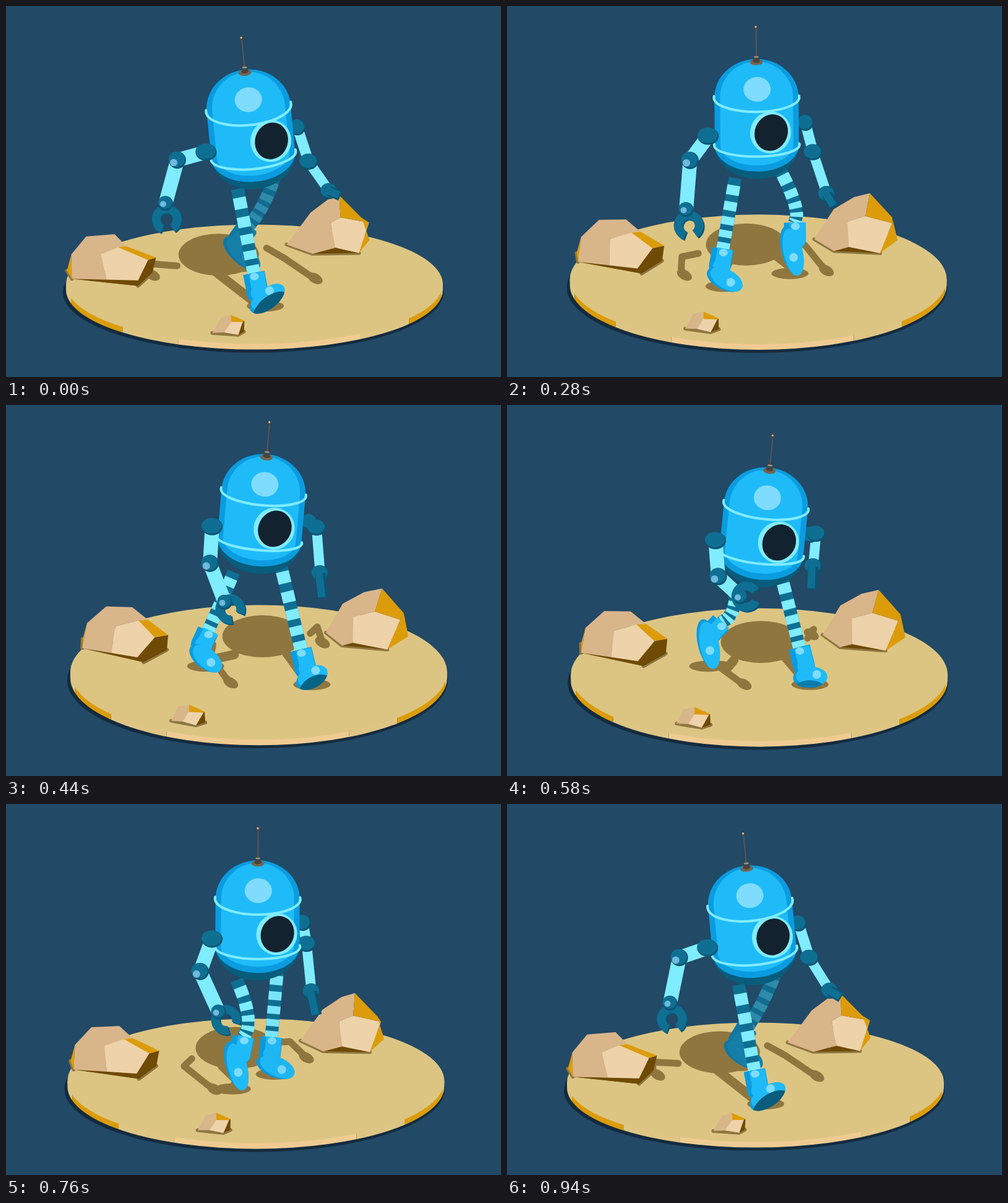
Write an HTML page with a canvas that moves like this. It is 800 by 600 pixels and loops after 960 ms.

```html
<!DOCTYPE html>
<html lang="en">
<head>
<meta charset="utf-8">
<title>Walking robot</title>
<style>
  html, body { margin: 0; width: 100%; height: 100%; overflow: hidden; background: #224966; }
  canvas { display: block; }
</style>
</head>
<body>
<canvas id="stage" width="800" height="600"></canvas>
<script>
const ctx = document.getElementById('stage').getContext('2d');
const TAU = Math.PI * 2, RAD = Math.PI / 180;
const LOOP = 960, STEP = 20;
const { sin, cos, max, min, hypot, atan2 } = Math;

const CYAN = '#80ecff', TEAL = '#0f6f93', DEEP = '#0b5573', NIGHT = '#075d7b';
const LIT = '#1fbbf9', MID = '#0b9ce0', SPOT = '#7fdcff', GLINT = '#6fb9dc';
const SAND = '#dcc583', SHADE = '#8f763f', GOLD = '#dc9c0a', BROWN = '#6f4a04';
const TAN = '#d9b58a', PALE = '#eed2a9';

// Rock corners: right of the disc centre, height, towards the viewer
const ROCKS = [{
  corners: [[-295, 12, 10], [-303, 16, -19], [-296, 42, -20], [-272, 62, -48], [-226, 68, -41],
    [-248, 42, -20], [-220, 42, -56], [-172, 43, 12], [-188, 24, 56], [-207, 40, -68],
    [-159, 37, -20], [-165, 8, -33], [-188, 4, 21], [-239, 18, 33]],
  shadow: [0, 1, 11, 12],
  faces: [[BROWN, 0, 13, 8, 7, 10, 11, 12], [GOLD, 0, 1, 2], [TAN, 0, 2, 3, 4, 9, 6, 5, 13],
    [PALE, 5, 6, 7, 8, 13], [GOLD, 6, 9, 10, 7]]
}, {
  corners: [[52, 0, -203], [91, 63, -168], [119, 75, -196], [137, 69, -236], [139, 48, -189],
    [123, 61, -121], [131, 30, -92], [169, 0, -159], [185, 43, -179], [173, 32, -238],
    [186, 2, -220], [94, 0, -155]],
  shadow: [0, 11, 7],
  faces: [[BROWN, 11, 6, 7], [TAN, 0, 1, 2, 3, 4, 5, 6, 11],
    [PALE, 4, 8, 7, 6, 5], [GOLD, 3, 9, 8, 4], [GOLD, 9, 10, 7, 8]]
}, {
  corners: [[-68, 5, 264], [-54, 32, 272], [-38, 34, 263], [-16, 20, 249], [-17, 0, 242],
    [-26, 2, 264], [-37, 24, 268], [-49, 5, 262], [-19, 17, 246]],
  shadow: [0, 5, 4],
  faces: [[BROWN, 8, 3, 4, 5], [TAN, 0, 1, 2, 6, 7], [PALE, 7, 6, 8, 5], [GOLD, 2, 3, 8, 6]]
}];

// Cosine of the walk cycle with its crest at the given time
const wave = (t, crest) => cos(TAU * (t - crest) / LOOP);
const clamp = k => max(0, min(1, k));

// Points hold x to the right, z towards the viewer and height h
const add = (p, q, k = 1) => ({ x: p.x + q.x * k, z: p.z + q.z * k, h: p.h + q.h * k });
const facing = (yaw, u, v, h) => ({ x: u * sin(yaw) + v * cos(yaw), z: u * cos(yaw) - v * sin(yaw), h });

function cameraAt(t) {
  const s = (1 - wave(t, -10)) / 2;
  return { s, x: 401.5 + 7 * s, y: 450 - 18 * s * s, tilt: .317 + .041 * s, turn: 17 * RAD * s };
}

let cam;
const project = p => [cam.x + p.x, cam.y + p.z * cam.tilt - p.h];
const spin = (x, h, z) => facing(-cam.turn, z, x, h);
const cast = p => ({ ...add(p, spin(-.2, 0, -.68), p.h), h: 0 });

function torsoAt(t) {
  const roll = -6 * RAD * wave(t, 50);
  const height = 295 - 13 * wave(2 * t, 220);
  const spine = d => ({ x: -11 * wave(t, 80) - d * sin(roll), z: 25, h: height - d * cos(roll) });
  return { roll, spine, yaw: (25 + 5 * wave(t, -117)) * RAD, hipYaw: (46 - 17 * cam.s) * RAD };
}

function armAt(t, side, { roll, spine, yaw }) {
  const phase = side < 0 ? t : t + LOOP / 2;
  const upper = wave(phase, 70), lower = wave(phase, 110);
  const reach = (p, length, swing, out) => add(p, facing(yaw,
    sin(swing * RAD) * cos(out * RAD), side * sin(out * RAD), -cos(swing * RAD) * cos(out * RAD)), length);
  const across = facing(yaw, 0, side * 84, 0);
  across.h = -across.x * sin(roll);
  const shoulder = add(spine(52), across);
  const elbow = reach(shoulder, 56, -20 - 50 * upper, 20 + 13 * upper);
  const bend = 27 - 57 * lower;
  const wrist = reach(elbow, 78, bend, 3 + 6 * lower);
  const hand = reach(wrist, 25, bend + 25, 0);
  return [shoulder, elbow, wrist, hand];
}

function legAt(t, side, { spine, hipYaw }) {
  const phase = side < 0 ? t : t + LOOP / 2;
  const stride = wave(phase, 10);
  const lift = max(0, -sin(TAU * ((phase - 10) / LOOP + .06)));
  const pitch = (38 * max(0, stride) ** 4 - 75 * lift) * RAD;
  const toe = facing(hipYaw, cos(pitch), 0, sin(pitch));
  const up = facing(hipYaw, -sin(pitch), 0, cos(pitch));
  const shoe = add({ x: 0, z: 25, h: 0 }, facing(hipYaw, 82 * stride, 55 * side, 15 + 40 * lift));
  const heel = add(add(shoe, toe, -14), up, 17);
  const hip = add(spine(122), facing(hipYaw, 0, 43 * side, 0));
  const middle = add(hip, add(heel, hip, -1), .5);
  const knee = add(middle, facing(hipYaw, 26 * lift, 0, 0));
  const shin = add(knee, heel, -1);
  const ankle = add(heel, shin, 30 / hypot(shin.x, shin.z * cam.tilt, shin.h));
  return { hip, knee, ankle, heel, shoe, toe, pitch };
}

function mix(a, b, k) {
  const part = (hex, i) => parseInt(hex.slice(i, i + 2), 16);
  return `rgb(${[1, 3, 5].map(i => Math.round(part(a, i) + (part(b, i) - part(a, i)) * k)).join()})`;
}

function oval(color, x, y, rx, ry = rx, tilt = 0) {
  ctx.fillStyle = color;
  ctx.beginPath();
  ctx.ellipse(x, y, rx, ry, tilt, 0, TAU);
  ctx.fill();
}

function line(color, width, points, cap = 'butt') {
  ctx.strokeStyle = color;
  ctx.lineWidth = width;
  ctx.lineCap = cap;
  ctx.lineJoin = 'round';
  ctx.beginPath();
  for (const p of points) ctx.lineTo(...p);
  ctx.stroke();
}

function polygon(color, points) {
  ctx.fillStyle = color;
  ctx.beginPath();
  for (const p of points) ctx.lineTo(...p);
  ctx.fill();
}

function drawDisc() {
  const { s, x, y, tilt } = cam;
  const rx = 304.5, ry = rx * tilt;
  const cuts = [-.7, -.405, .563, .82].map(k => x + rx * (k - .085 * s));
  const edges = [0, x - .974 * rx, ...cuts, x + .99 * rx, 800];
  const colors = [SAND, GOLD, '#dfc584', '#efcb91', '#dfc584', GOLD, SAND];
  oval('#142b3f', x - 2, y + 13, rx + 3, ry + 1);
  colors.forEach((color, i) => {
    ctx.save();
    ctx.beginPath();
    ctx.rect(edges[i], 0, edges[i + 1] - edges[i], 600);
    ctx.clip();
    ctx.fillStyle = color;
    ctx.beginPath();
    ctx.ellipse(x, y + 9, rx, ry, 0, 0, Math.PI);
    ctx.lineTo(x - rx, y);
    ctx.lineTo(x + rx, y);
    ctx.fill();
    ctx.restore();
  });
  oval(SAND, x, y, rx, ry);
}

function drawRock({ corners, shadow, faces }) {
  const dots = corners.map(c => project(spin(...c)));
  ctx.lineJoin = 'round';
  ctx.strokeStyle = SHADE;
  ctx.lineWidth = 6;
  polygon(SHADE, shadow.map(i => dots[i]));
  ctx.stroke();
  for (const [color, ...ids] of faces) polygon(color, ids.map(i => dots[i]));
}

function drawShadow(torso, arms, legs) {
  const ground = p => project(cast(p));
  const [x, y] = ground(torso.spine(35));
  oval(SHADE, x, y, 65, 34);
  for (const arm of arms) {
    line(SHADE, 11, arm.map(ground), 'round');
    oval(SHADE, ...ground(arm[3]), 13, 8, .5);
  }
  for (const { hip, knee, heel, shoe } of legs) {
    line(SHADE, 15, [hip, knee, heel].map(ground), 'round');
    oval(SHADE, ...ground(shoe), 30, 9);
  }
}

function drawShoe({ shoe, toe, pitch }, tone) {
  const dx = toe.x, dy = toe.z * cam.tilt - toe.h;
  const rx = 16 + 24 * hypot(dx, dy), ry = 17;
  const sole = clamp(pitch / .6);
  ctx.save();
  ctx.translate(...project(shoe));
  ctx.rotate(atan2(dy, dx));
  ctx.beginPath();
  ctx.ellipse(0, 0, rx, ry, 0, 0, TAU);
  ctx.clip();
  oval(tone(MID), 0, 0, rx, ry);
  oval(tone(LIT), 5, -3, rx, ry);
  oval(tone(SPOT), 11, -8 * sole, 7);
  if (sole > 0) oval(mix(MID, NIGHT, sole), -3, ry * (1.8 - sole), rx, ry);
  ctx.restore();
}

function drawLeg(leg) {
  const [hip, knee, ankle, heel] = [leg.hip, leg.knee, leg.ankle, leg.heel].map(project);
  const dim = .75 * clamp((-leg.shoe.z - 20) / 40);
  const tone = color => mix(color, '#126b8d', dim);
  const bend = u => [0, 1].map(i =>
    (1 - u) ** 2 * hip[i] + u * (1 - u) * (4 * knee[i] - hip[i] - heel[i]) + u * u * ankle[i]);
  const band = (color, from, to) =>
    line(color, 21, [0, .25, .5, .75, 1].map(k => bend(from + (to - from) * k)));
  band(tone(TEAL), 0, 1);
  for (let i = 0; i < 5; i++) band(tone(CYAN), (i + .42) / 5, (i + 1) / 5);
  line(tone(MID), 35, [ankle, heel]);
  oval(tone(MID), ...heel, 17.5);
  line(tone(LIT), 25, [ankle, heel].map(([x, y]) => [x + 4, y]));
  oval(tone(LIT), heel[0] + 3, heel[1], 14);
  oval(tone(SPOT), ankle[0] + 1, ankle[1] + 6, 7, 6);
  drawShoe(leg, tone);
}

function ball([x, y], rx, ry = rx) {
  oval(DEEP, x, y, rx, ry);
  oval(TEAL, x - 1, y - 1.5, rx - 1, ry - 1.5);
}

function drawFarArm(arm) {
  const [shoulder, elbow, wrist, hand] = arm.map(project);
  const tip = wrist.map((w, i) => w + 1.5 * (hand[i] - w));
  line(CYAN, 17, [shoulder, elbow]);
  line(CYAN, 16, [elbow, wrist]);
  ball(shoulder, 13);
  ball(elbow, 15, 13);
  ball(wrist, 14, 13);
  line(DEEP, 17, [wrist, tip]);
  line(TEAL, 12, [wrist, tip].map(([x, y]) => [x - 2, y - 1]));
}

function drawNearArm(arm) {
  const [shoulder, elbow, wrist, hand] = arm.map(project);
  const dir = atan2(hand[1] - wrist[1], hand[0] - wrist[0]);
  line(CYAN, 23, [shoulder, elbow]);
  line(CYAN, 23, [elbow, wrist]);
  ball(shoulder, 17, 14);
  ball(elbow, 14);
  oval(GLINT, elbow[0] - 6, elbow[1] + 4, 6);
  for (const [color, shift] of [[DEEP, 2], [TEAL, 0]]) {
    ctx.strokeStyle = color;
    ctx.lineWidth = 14;
    ctx.lineCap = 'butt';
    ctx.beginPath();
    ctx.arc(hand[0] + shift, hand[1] + shift, 17, dir + .5, dir + TAU - .5);
    ctx.stroke();
  }
  ball(wrist, 12);
  oval(GLINT, wrist[0] - 4, wrist[1] + 1, 5);
}

function drawAntenna(y) {
  oval('#74654f', 0, y, 10.5, 5);
  oval('#4a443d', 0, y - 2, 6, 3);
  for (let i = 0; i < 3; i++) oval(i % 2 ? '#9b8f80' : '#45413d', 0, y - 5 - i * 3.5, 4.5 - i * .5, 1.6);
  line('#5a5550', 2, [[0, y - 10], [0, y - 56]]);
  oval('#4a443d', 0, y - 56, 3);
  oval('#d9b99b', -.5, y - 57, 1.7);
}

function drawBody({ roll, spine, yaw }) {
  const waist = 77, sag = 28 - 7 * cam.s;
  const shell = (color, rx, ry, bowl) => {
    ctx.fillStyle = color;
    ctx.beginPath();
    ctx.ellipse(0, 0, rx, ry, 0, Math.PI, TAU);
    ctx.ellipse(0, waist, rx, bowl, 0, 0, Math.PI);
    ctx.fill();
  };
  const ring = (y, drop) => {
    ctx.strokeStyle = CYAN;
    ctx.lineWidth = 4;
    ctx.lineCap = 'round';
    ctx.beginPath();
    ctx.ellipse(0, y, 69, drop, 0, -.1, Math.PI + .1);
    ctx.stroke();
  };
  const port = 66 * sin(yaw);
  ctx.save();
  ctx.translate(...project(spine(0)));
  oval(SPOT, 1, -13, 22, 20);
  ctx.rotate(roll);
  shell(NIGHT, 68, 62, 55);
  shell(MID, 68, 62, 43);
  shell(LIT, 59, 58, 33);
  ring(0, sag);
  ring(waist, sag * .8);
  oval(SPOT, 1, -13, 22, 20);
  oval(CYAN, port - 1, 57, 33, 34, .4);
  oval('#13222f', port, 57, 26.5, 30, .4);
  drawAntenna(-57);
  ctx.restore();
}

function draw(t) {
  cam = cameraAt(t);
  const torso = torsoAt(t);
  const [nearArm, farArm] = [-1, 1].map(side => armAt(t, side, torso));
  const legs = [-1, 1].map(side => legAt(t, side, torso)).sort((a, b) => a.shoe.z - b.shoe.z);
  ctx.fillStyle = '#224966';
  ctx.fillRect(0, 0, 800, 600);
  drawDisc();
  drawShadow(torso, [nearArm, farArm], legs);
  ROCKS.forEach(drawRock);
  legs.forEach(drawLeg);
  drawFarArm(farArm);
  drawBody(torso);
  drawNearArm(nearArm);
}

const start = performance.now();
function tick() {
  const elapsed = (performance.now() - start) % LOOP;
  draw(Math.floor(elapsed / STEP) * STEP);
  requestAnimationFrame(tick);
}
tick();
</script>
</body>
</html>
```
